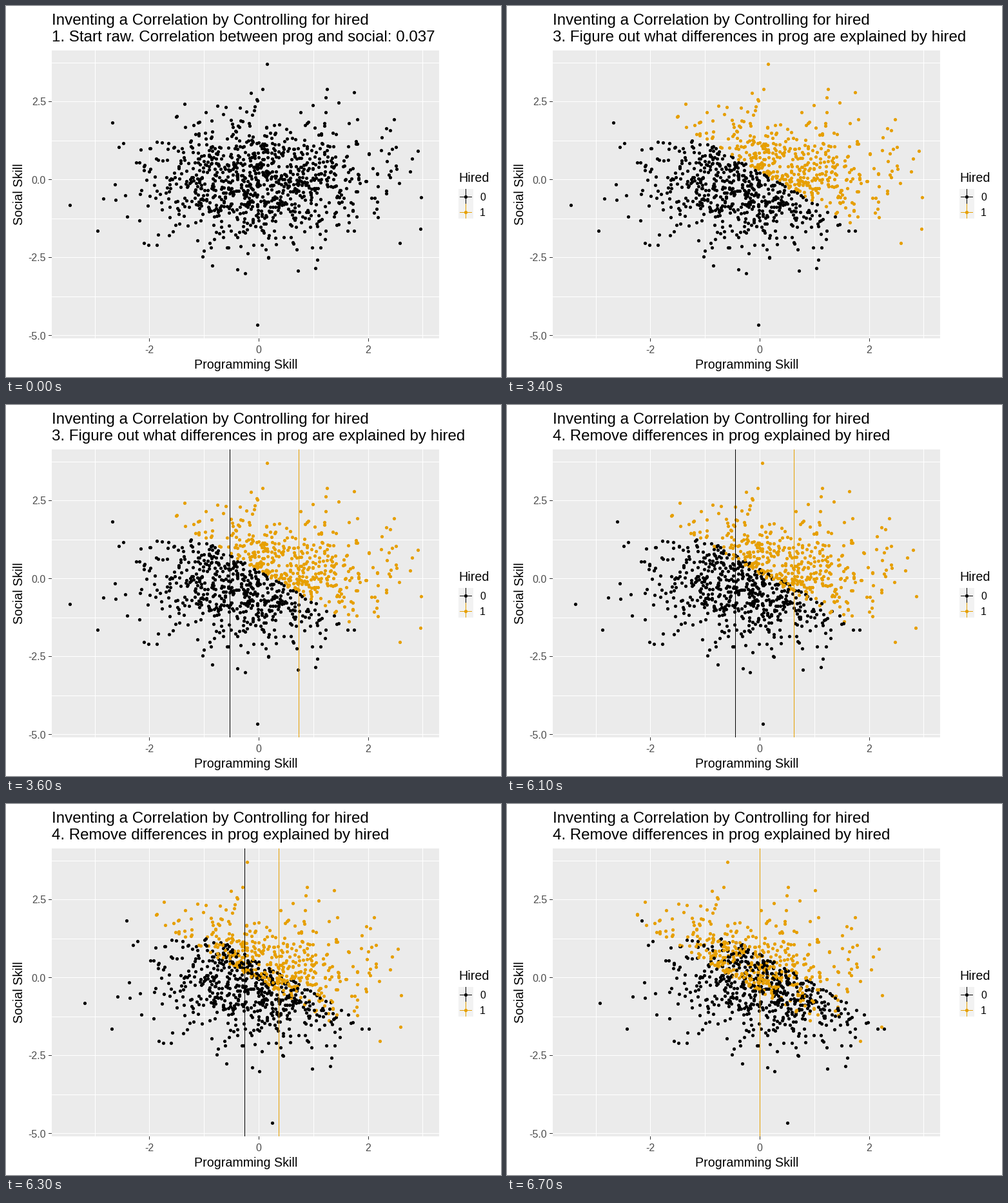
These frames come from a looping animation (768 by 576 pixels, 8000 ms). A matplotlib script:

```python
import math

import matplotlib.pyplot as plt
import numpy as np
from matplotlib.animation import FuncAnimation
from matplotlib.patches import Rectangle

W, H, DPI = 768, 576, 96
PT = 72 / DPI                       # points per pixel
X0, Y0, SX, SY = 392, 269, 84.8, 48.4
LEFT, TOP, RIGHT, BOTTOM = 71, 69, 672, 516
BLACK, GOLD = "#000000", "#E69F00"
INK, DIM = "#333333", "#4D4D4D"
MEANS = (-0.526, 0.736)             # mean skill of each group
REACH = 3.1                         # radius of the random cloud

TITLE = "Inventing a Correlation by Controlling for hired"
STEPS = [
    "1. Start raw. Correlation between prog and social: 0.037",
    "2. Separate data by the values of hired.",
    "3. Figure out what differences in prog are explained by hired",
    "4. Remove differences in prog explained by hired",
]

# The few extreme cases, as (prog, social)
EXTREMES = [
    (-3.45, -0.83), (-2.95, -1.65), (-2.68, 1.82), (-0.02, -4.67),
    (0.15, 3.70), (1.25, 2.89), (1.75, 2.79), (2.48, 1.92),
    (2.96, -1.59), (2.58, -2.05),
]


def normals(seed, n):
    """Normal numbers by inversion of a Mersenne Twister stream."""
    state = []
    for _ in range(675):
        seed = (69069 * seed + 1) % 2**32
        state.append(seed)
    rng = np.random.RandomState()
    rng.set_state(("MT19937", np.array(state[51:], dtype=np.uint32), 624))
    u = rng.randint(0, 2**32, size=2 * n, dtype=np.uint32) / 2**32
    u = (np.floor(u[::2] * 2**27) + u[1::2]) / 2**27
    z = np.linspace(-5, 5, 4001)
    cdf = [0.5 * (1 + math.erf(v / math.sqrt(2))) for v in z]
    return np.interp(u, cdf, z)


def make_cloud():
    pts = normals(14233, 2000).reshape(2, 1000).T
    return np.vstack([pts[np.hypot(*pts.T) < REACH], EXTREMES])


def px(v):
    return np.floor(X0 + SX * np.asarray(v) + 0.5)


def py(v):
    return np.floor(Y0 - SY * np.asarray(v) + 0.5)


prog, social = make_cloud().T
hired = prog + social > 0.25
group_colors = np.where(hired, GOLD, BLACK)
group_mean = np.where(hired, MEANS[1], MEANS[0])

plt.rcParams["font.family"] = "Liberation Sans"
fig = plt.figure(figsize=(W / DPI, H / DPI), dpi=DPI, facecolor="white")
ax = fig.add_axes([0, 0, 1, 1])
ax.set_xlim(0, W)
ax.set_ylim(H, 0)
ax.axis("off")


def box(x, y, w, h, color, z=0):
    return ax.add_patch(Rectangle((x, y), w, h, fc=color, ec="none", lw=0,
                                  zorder=z))


def label(x, y, text, size, color="black", ha="left", **kw):
    return ax.text(x, y, text, fontsize=size * PT, color=color, ha=ha,
                   va="baseline", **kw)


def dots(x, y, color):
    return ax.scatter(x + 0.5, y + 0.5, s=(5.2 * PT)**2, c=color,
                      edgecolors="none", linewidths=0, zorder=3)


def draw_panel():
    w, h = RIGHT - LEFT, BOTTOM - TOP
    box(LEFT, TOP, w, h, "#EBEBEB")
    for v in range(-3, 4):
        x = px(v)
        box(x, TOP, 1, h, "white", 1)
        if v % 2 == 0:
            box(x, BOTTOM, 1, 5, INK, 1)
            label(x, 539, str(v), 16, DIM, "center")
    for i in range(-4, 4):
        v = 1.25 * i
        y = py(v)
        box(LEFT, y, w, 1, "white", 1)
        if i % 2 == 0:
            box(LEFT - 5, y, 5, 1, INK, 1)
            label(62, y + 6.5, f"{v:.1f}", 16, DIM, "right")
    label(372, 563, "Programming Skill", 19.6, ha="center")
    label(26, 292.5, "Social Skill", 19.6, ha="center", rotation=90,
          rotation_mode="anchor")


def draw_legend():
    label(702, 273, "Hired", 19.8)
    box(702, 284, 23, 46, "#F2F2F2")
    for i, color in enumerate((BLACK, GOLD)):
        y = 296 + 24 * i
        box(713, 284 + 23 * i, 1, 23, color, 2)
        box(704, y, 19, 1, color, 2)
        dots(713, y, color)
        label(735, y + 6, str(i), 16)


draw_panel()
draw_legend()
label(LEFT, 29, TITLE, 24.15)
subtitle = label(LEFT, 55, "", 24.15)
points = dots(px(prog), py(social), group_colors)
marks = [box(0, TOP, 1, BOTTOM - TOP, c, 4) for c in (BLACK, GOLD)]


def update(i):
    step = sum(i >= start for start in (5, 34, 60))
    subtitle.set_text(STEPS[step])
    points.set_facecolor(group_colors if step else BLACK)

    t = min(max(i - 59, 0), 8) / 8
    k = (1 - math.cos(math.pi * t)) / 2        # sine in and out
    xs = px(prog - group_mean * k)
    points.set_offsets(np.column_stack([xs, py(social)]) + 0.5)

    for mark, mean in zip(marks, MEANS):
        mark.set_x(px(mean * (1 - k)))
        mark.set_visible(i >= 36)
    return [points, subtitle, *marks]


anim = FuncAnimation(fig, update, frames=80, interval=100, repeat=True,
                     repeat_delay=0, blit=False)
plt.show()
```
